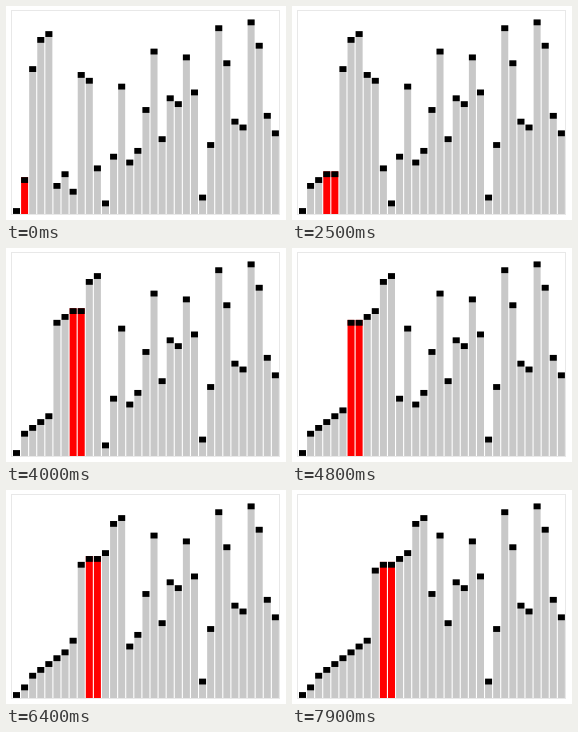
An HTML page with a canvas that plays this animation: 280x214 px, repeating every 8000 ms.

```html
<!DOCTYPE html>
<html lang="en">
<head>
<meta charset="utf-8">
<title>Insertion sort</title>
<style>
  html, body { margin: 0; height: 100%; overflow: hidden; background: #fff; }
  canvas { display: block; }
</style>
</head>
<body>
<canvas id="stage" width="280" height="214"></canvas>
<script>
const ctx = document.getElementById('stage').getContext('2d');
const LOOP = 8000, HOLD = 1000, STEP = 100;
const FLOOR = 208, PITCH = 8.09, BAR = 7, UNIT = 5.84, CAP = 5.8;

// The smallest bar rests on the floor, so it is a little below 1.
const values = [0.7, 6, 25, 30, 31, 5, 7, 4, 24, 23, 8, 2, 10, 22, 9, 11, 18,
  28, 13, 20, 19, 27, 21, 3, 12, 32, 26, 16, 15, 33, 29, 17, 14];

// One snapshot per shift, and one when the key lands.
function recordSort(source) {
  const bars = source.slice(), history = [];
  const record = (...marked) => history.push({ bars: bars.slice(), marked });
  for (let i = 1; i < bars.length; i++) {
    const key = bars[i];
    let j = i;
    for (; j > 0 && bars[j - 1] > key; j--) {
      bars[j] = bars[j - 1];
      record(j - 1, j);
    }
    bars[j] = key;
    record(j);
  }
  return history;
}

const history = recordSort(values);

function draw({ bars, marked }) {
  ctx.fillStyle = '#fff';
  ctx.fillRect(0, 0, 280, 214);
  ctx.strokeStyle = '#e8e8e8';
  ctx.strokeRect(5.5, 4.5, 268, 204);
  bars.forEach((value, i) => {
    const x = 7 + i * PITCH;
    const top = 206.2 - value * UNIT;
    ctx.fillStyle = marked.includes(i) ? '#f00' : '#c8c8c8';
    ctx.fillRect(x, top, BAR, FLOOR - top);
    ctx.fillStyle = '#000';
    ctx.fillRect(x, top, BAR, CAP);
  });
}

function tick() {
  const t = performance.now() % LOOP;
  draw(history[t < HOLD ? 0 : Math.floor((t - HOLD) / STEP) + 1]);
  requestAnimationFrame(tick);
}
tick();
</script>
</body>
</html>
```
